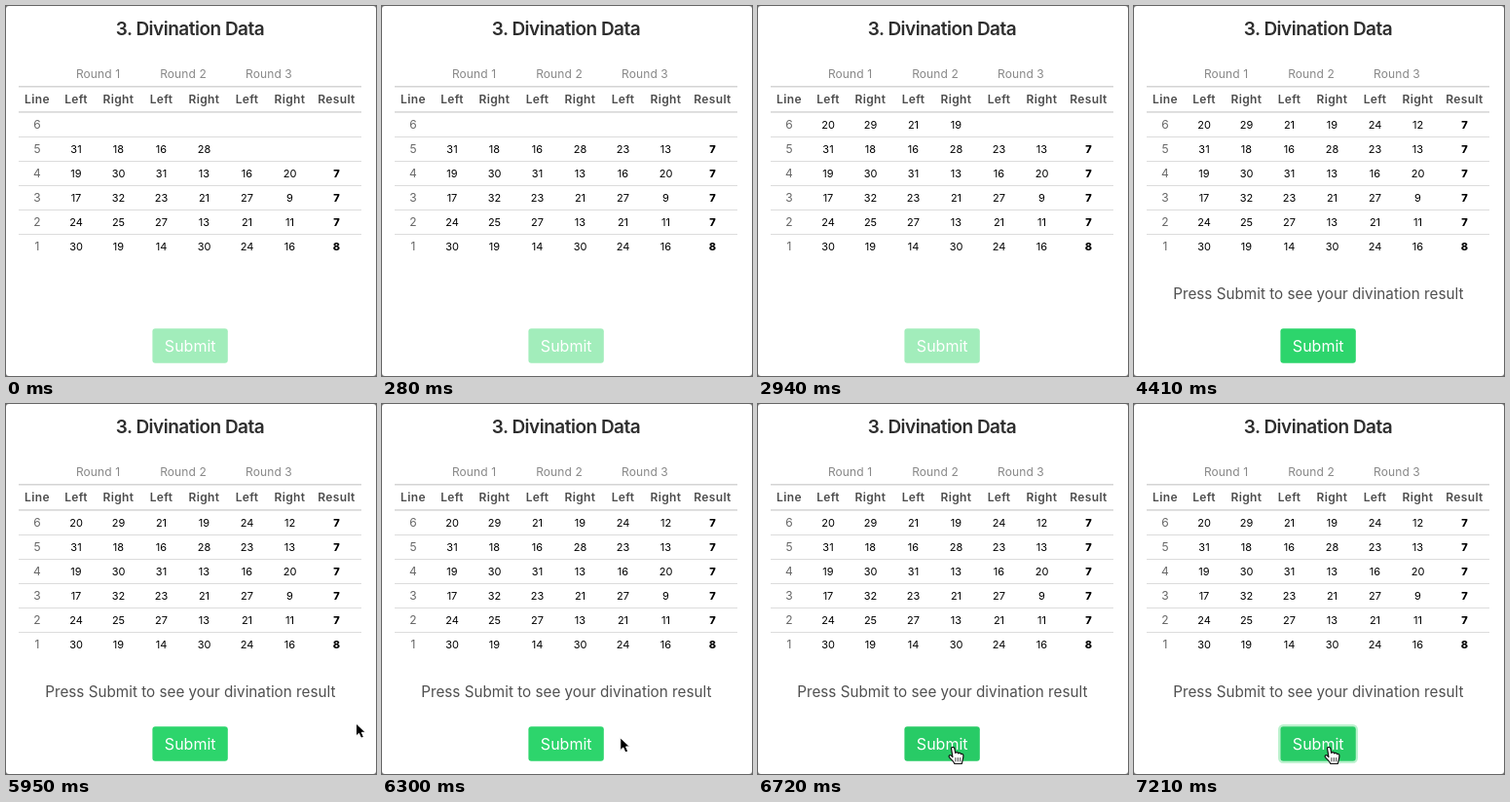
An HTML page for the animation above (8.19 s loop, 380 by 380 pixels).

```html
<!DOCTYPE html>
<html lang="en">
<head>
<meta charset="utf-8">
<title>Divination Data</title>
<style>
  html, body { margin: 0; width: 100%; height: 100%; overflow: hidden; background: #777; }
  svg { display: block; width: 100vw; height: 100vh; font-family: Inter, Roboto, sans-serif; }
  text { text-anchor: middle; }
  .title { font-size: 19px; font-weight: 600; letter-spacing: -.5px; fill: #2e2e2e; }
  .round { font-size: 12px; letter-spacing: .1px; fill: #888; }
  .head { font-size: 12px; font-weight: 600; letter-spacing: .35px; fill: #4c4c4c; }
  .line { font-size: 12px; fill: #666; }
  .cell { font-size: 11px; fill: #000; }
  .result { font-size: 11px; font-weight: 800; fill: #000; }
  .prompt { font-size: 15.25px; fill: #505050; }
  .submit { font-size: 16px; fill: #fff; }
</style>
</head>
<body>
<svg viewBox="0 0 380 380">
  <rect width="380" height="380" rx="3" fill="#fff"/>
  <text class="title" x="189" y="30">3. Divination Data</text>
  <g id="table"></g>
  <text id="prompt" class="prompt" x="189.3" y="301">Press Submit to see your divination result</text>
  <rect id="ring" x="149.2" y="330.2" width="79.6" height="37.6" rx="4" fill="none" stroke="#bdf2cf" stroke-width="2.4"/>
  <rect id="button" x="150.4" y="331.2" width="77.4" height="35.6" rx="3"/>
  <text class="submit" x="189.2" y="355">Submit</text>
  <g id="cursor">
    <path id="arrow" d="M0 0V13L3 10.3L5.2 15.2L7.9 14L5.8 9.3H9.7Z" fill="#000" stroke="#fff" stroke-width="1"/>
    <g id="hand" stroke="#111" stroke-linejoin="round" stroke-linecap="round">
      <path d="M-2 1.2C-2-.6 1-.6 1.3 1.2L2.2 6C2.6 4.6 5 4.8 5.2 6.4C5.8 5.4 7.8 5.8 8 7.2C8.8 6.4 10.4 7 10.4 8.6C10.5 12 9.4 13.5 8.8 17H1.4C.6 14.6-2 12.8-4 10.4C-5.2 8.8-3.4 7.4-2 8.6L-.6 10Z" fill="#fff" stroke-width="1.2"/>
      <path d="M2.4 11V14.4M4.8 11V14.4M7.2 11V14.4" fill="none" stroke-width=".8"/>
    </g>
  </g>
</svg>
<script>
const LOOP = 8190, TICK = 70;
const READY = 4410, ENTER = 5950, REST = 6720, PRESS = 7140, RELEASE = 7210;
const columns = [32, 72, 115.5, 159.5, 203.5, 247.5, 291.5, 339.5];
const rows = [
  [6, 20, 29, 21, 19, 24, 12, 7],
  [5, 31, 18, 16, 28, 23, 13, 7],
  [4, 19, 30, 31, 13, 16, 20, 7],
  [3, 17, 32, 23, 21, 27, 9, 7],
  [2, 24, 25, 27, 13, 21, 11, 7],
  [1, 30, 19, 14, 30, 24, 16, 8]
];
const $ = id => document.getElementById(id);
const timed = [[$('prompt'), READY]];

function add(tag, attrs, text = '') {
  const el = document.createElementNS('http://www.w3.org/2000/svg', tag);
  for (const key in attrs) el.setAttribute(key, attrs[key]);
  el.textContent = text;
  return $('table').appendChild(el);
}

const label = (kind, x, y, text) => add('text', { class: kind, x, y }, text);
const rule = (y, height, fill) => add('rect', { x: 13, y, width: 352, height, fill });

// Time at which a cell's value is entered
function entryTime(row, col) {
  if (row === 0 && col > 0) return col < 3 ? 1960 : col < 5 ? 2940 : READY;
  return row === 1 && col > 4 ? 280 : 0;
}

function buildTable() {
  [94.5, 182, 270].forEach((x, i) => label('round', x, 74.3, `Round ${i + 1}`));
  ['Line', 'Left', 'Right', 'Left', 'Right', 'Left', 'Right', 'Result']
    .forEach((name, i) => label('head', columns[i], 100.3, name));
  rule(82, 1.5, '#d4d4d4');
  rule(108.2, 1.5, '#d4d4d4');
  rows.forEach((values, r) => {
    if (r) rule(109 + 25 * r, 1, '#dcdcdc');
    values.forEach((value, c) => {
      const kind = c === 0 ? 'line' : c === 7 ? 'result' : 'cell';
      const el = label(kind, columns[c], 126 + 25 * r + (c ? 0 : .3), value);
      timed.push([el, entryTime(r, c)]);
    });
  });
}

const show = (el, on) => el.setAttribute('visibility', on ? 'visible' : 'hidden');

function render(t) {
  for (const [el, start] of timed) show(el, t >= start);

  // The pointer slows down as it reaches the button
  const step = Math.floor((t - ENTER) / TICK) * TICK;
  const left = 1 - Math.min(1, Math.max(0, step / (REST - ENTER)));
  const x = 200.5 + 159 * left ** 2.11;
  const y = 352.5 - 24.5 * left ** 1.5;
  const inside = t >= ENTER;
  const hover = inside && x < 228;
  $('cursor').setAttribute('transform', `translate(${x.toFixed(2)} ${y.toFixed(2)})`);
  show($('arrow'), inside && !hover);
  show($('hand'), hover);

  const pressed = t >= PRESS && t < RELEASE;
  const fill = t < READY ? '#a2edbb' : pressed ? '#24bf5d' : hover ? '#28cb66' : '#2dd56c';
  $('button').setAttribute('fill', fill);
  show($('ring'), t >= PRESS);
}

buildTable();
const origin = performance.now();
function frame() {
  render((performance.now() - origin) % LOOP);
  requestAnimationFrame(frame);
}
frame();
</script>
</body>
</html>
```
